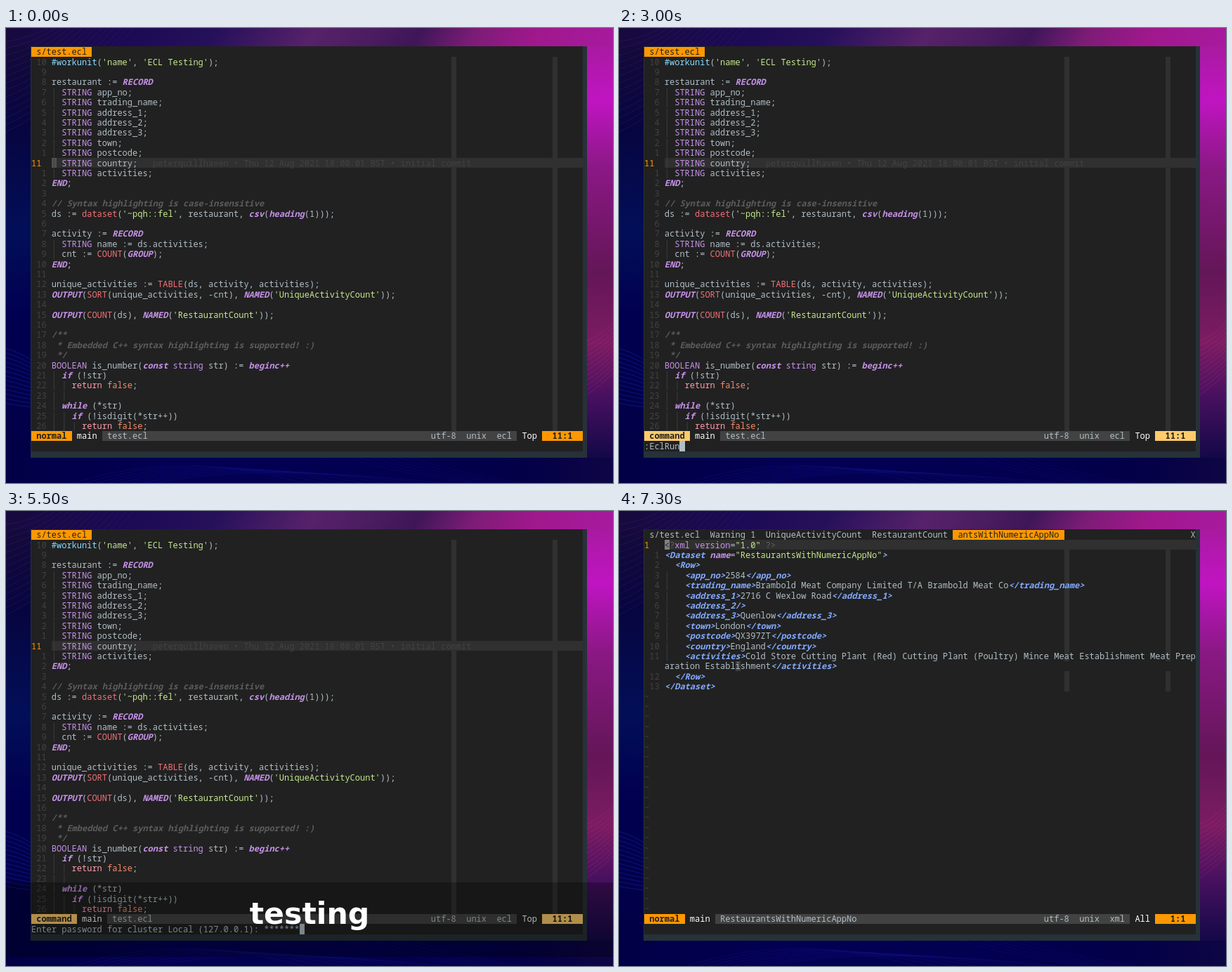
These frames come from a looping animation (864x648 px, 8000 ms). An HTML page:

```html
<!DOCTYPE html>
<html lang="en">
<head>
<meta charset="utf-8">
<title>Editor session</title>
<style>
html, body { margin: 0; width: 100%; height: 100%; overflow: hidden; background: #02004a; }
svg { display: block; width: 100vw; height: 100vh; }
rect { shape-rendering: crispEdges; }
text { font: 500 12px "Noto Sans Mono", "DejaVu Sans Mono", monospace; white-space: pre; fill: #b0bec5; }
#keys text { font: bold 42.67px "DejaVu Sans", sans-serif; fill: #fff; text-anchor: middle; }
.p { fill: #c792ea; }
.k { fill: #c792ea; font-weight: bold; font-style: italic; }
.b { fill: #82aaff; font-weight: bold; font-style: italic; }
.c { fill: #89ddff; }
.g { fill: #c3e88d; }
.r { fill: #f07178; }
.n { fill: #ff9cac; }
.o { fill: #f78c6c; }
.m { fill: #5c5c5c; font-weight: bold; font-style: italic; }
.d { fill: #424242; }
.q { fill: #616161; }
.l { fill: #ff9800; }
.w { fill: #fff; }
.x { fill: #212121; }
.X { fill: #212121; font-weight: bold; }
</style>
</head>
<body>
<svg viewBox="0 0 864 648" preserveAspectRatio="none">
  <defs id="defs"></defs>
  <g id="wall"></g>
  <rect x="35" y="26" width="792" height="586" fill="#263238"/>
  <rect x="36" y="26" width="785" height="576.6" fill="#212121"/>
  <g id="code"></g>
  <g id="xml"></g>
  <g id="status"></g>
  <g id="keys">
    <rect y="529" width="864" height="106" opacity=".3"/>
    <text x="432" y="588"></text>
    <rect id="line" y="589" height="3" fill="#fff"/>
  </g>
</svg>
<script>
const $ = id => document.getElementById(id);
const LOOP = 8000, CW = 7.2, RH = 14.4, LEFT = 36, TOP = 26.6;
const ORANGE = '#ff9800', YELLOW = '#ffcb6b', LINE = '#303030', GREY = '#424242';
const esc = s => s.replace(/&/g, '&amp;').replace(/</g, '&lt;');
const colX = c => +(LEFT + c * CW).toFixed(2);
const rowY = r => +(TOP + r * RH).toFixed(2);

// A filled block of terminal cells
const cells = (col, row, w, fill, h = 1) =>
  `<rect x="${colX(col)}" y="${rowY(row)}" width="${w * CW}" height="${h * RH}" fill="${fill}"/>`;

// Text at a cell; runs between § marks start with their style letter
function put(col, row, src) {
  let out = '';
  src.split('§').forEach((part, i) => {
    const style = i % 2 ? part[0] : '';
    const s = i % 2 ? part.slice(1) : part;
    if (s.trim()) out += `<tspan class="${style}" x="${colX(col)}">${esc(s)}</tspan>`;
    col += s.length;
  });
  return `<text y="${rowY(row) + 11.6}">${out}</text>`;
}

const guides = s => s.replace(/^[| ]*\|/, m => `§d${m}§`);
const lineNo = (n, row) => put(0, row, `§d${String(n).padStart(3)}§`);

const CODE = `§c#workunit§(§g'name'§, §g'ECL Testing'§);

restaurant := §kRECORD§
| §pSTRING§ app_no;
| §pSTRING§ trading_name;
| §pSTRING§ address_1;
| §pSTRING§ address_2;
| §pSTRING§ address_3;
| §pSTRING§ town;
| §pSTRING§ postcode;
| §pSTRING§ country;
| §pSTRING§ activities;
§kEND§;

§m// Syntax highlighting is case-insensitive§
ds := §rdataset§(§g'~pqh::fel'§, restaurant, §kcsv§(§kheading§(1)));

activity := §kRECORD§
| §pSTRING§ name := ds.activities;
| cnt := §rCOUNT§(§kGROUP§);
§kEND§;

unique_activities := §rTABLE§(ds, activity, activities);
§kOUTPUT§(§rSORT§(unique_activities, -cnt), §kNAMED§(§g'UniqueActivityCount'§));

§kOUTPUT§(§rCOUNT§(ds), §kNAMED§(§g'RestaurantCount'§));

§m/**§
§m * Embedded C++ syntax highlighting is supported! :)§
§m */§
§pBOOLEAN§ is_number(§kconst§ §pstring§ str) := §kbeginc++§
| §kif§ (!str)
| | §nreturn§ §ofalse§;
| |
| §kwhile§ (*str)
| | §kif§ (!isdigit(*str++))
| | | §nreturn§ §ofalse§;`.split('\n');

const tag = (name, value) => `|   §b<${name}>§${value}§b</${name}>§`;
const XML = [
  '§x<§§q?§§pxml version§=§g"1.0"§ §q?>§',
  '§b<Dataset§ §kname§=§g"RestaurantsWithNumericAppNo"§§b>§',
  '  §b<Row>§',
  tag('app_no', '2584'),
  tag('trading_name', 'Brambold Meat Company Limited T/A Brambold Meat Co'),
  tag('address_1', '2716 C Wexlow Road'),
  '|   §b<address_2/>§',
  tag('address_3', 'Quenlow'),
  tag('town', 'London'),
  tag('postcode', 'QX397ZT'),
  tag('country', 'England'),
  '|   §b<activities>§Cold Store Cutting Plant (Red) Cutting Plant (Poultry) Mince Meat Establishment Meat Prep',
  'aration Establishment§b</activities>§',
  '  §b</Row>§',
  '§b</Dataset>§'
];

function buildCode() {
  let s = cells(83, 1, 1, LINE, 37) + cells(103, 1, 1, LINE, 37) + cells(4, 11, 105, LINE);
  s += `<g id="cursor">${cells(4, 11, 1, '#505050')}</g>`;
  s += cells(0, 0, 12, ORANGE) + put(1, 0, '§xs/test.ecl§');
  CODE.forEach((line, i) => {
    const row = i + 1;
    s += row === 11 ? put(0, row, '§l11§') : lineNo(Math.abs(row - 11), row);
    s += put(4, row, guides(line));
  });
  return s + put(24, 11, '§dpeterquillhaven • Thu 12 Aug 2021 18:00:01 BST • initial commit§');
}

function buildXml() {
  let s = cells(4, 1, 105, LINE) + cells(4, 1, 1, '#808080') + cells(18, 13, 1, '#3e3e3e');
  for (const c of [83, 103]) s += cells(c, 2, 1, LINE, 11) + cells(c, 14, 1, LINE, 2);
  s += cells(61, 0, 22, ORANGE);
  s += put(1, 0, 's/test.ecl  Warning 1  UniqueActivityCount  RestaurantCount');
  s += put(62, 0, '§xantsWithNumericAppNo§') + put(108, 0, 'X');
  s += put(0, 1, '§l1§');
  XML.forEach((line, i) => {
    if (i && i !== 12) s += lineNo(i > 12 ? i - 1 : i, i + 1);
    s += put(4, i + 1, guides(line));
  });
  for (let r = 16; r < 38; r++) s += put(0, r, '§d~§');
  return s;
}

function buildStatus({ mode, cmd, caret, xml }) {
  const w = mode.length + 2, R = 38;
  const fill = mode === 'normal' ? ORANGE : YELLOW;
  const [file, type, at, pos] = xml
    ? ['RestaurantsWithNumericAppNo', 'xml', 'All', ' 1:1']
    : ['test.ecl', 'ecl', 'Top', '11:1'];
  return cells(0, R, w, fill) + cells(w + 6, R, 90 - w, GREY) + cells(101, R, 8, fill) +
    put(1, R, `§X${mode}§`) + put(w + 1, R, '§wmain§') + put(w + 7, R, file) +
    put(79, R, `utf-8  unix  ${type}`) + put(97, R, `§w${at}§`) + put(103, R, `§X${pos}§`) +
    put(0, 39, cmd) + (caret ? cells(cmd.length, 39, 1, '#b0bec5') : '');
}

function buildWall() {
  const strip = (id, box, vertical, stops) => {
    const [x, y, w, h] = box;
    $('defs').innerHTML += `<linearGradient id="${id}" x2="${vertical ? 0 : 1}" y2="${vertical ? 1 : 0}">` +
      stops.map(([o, c]) => `<stop offset="${o}" stop-color="${c}"/>`).join('') + '</linearGradient>';
    return `<rect x="${x}" y="${y}" width="${w}" height="${h}" fill="url(#${id})"/>`;
  };
  let s = strip('left', [0, 26, 36, 586], true, [[0, '#150a3a'], [.2, '#070540'], [.45, '#020f58'],
    [.65, '#010050'], [1, '#010046']]);
  s += strip('right', [827, 26, 37, 586], true, [[0, '#a81aa0'], [.13, '#c014c2'], [.3, '#8a1884'],
    [.55, '#641658'], [.72, '#7c1c62'], [.85, '#481060'], [1, '#140848']]);
  s += strip('bottom', [0, 612, 864, 36], false, [[0, '#010046'], [.3, '#030054'], [.6, '#020050'],
    [.85, '#030048'], [1, '#0e0644']]);
  // The top bands lean to the left
  s += '<g transform="skewX(-30)">' + strip('top', [0, 0, 884, 26], false, [[0, '#170a3c'], [.2, '#1c0a54'],
    [.34, '#26105a'], [.5, '#56226a'], [.6, '#4a1c60'], [.67, '#3e1658'], [.76, '#7c1c76'],
    [.86, '#a0188c'], [1, '#a81aa0']]) + '</g>';

  const waves = (n, color, opacity, curve) => {
    let d = '';
    for (let i = 0; i < n; i++) d += curve(i);
    return `<path d="${d}" fill="none" stroke="${color}" stroke-width="1" opacity="${opacity}"/>`;
  };
  s += waves(14, '#4a2a9a', .25, i => `M-4 ${20 + i * 10}Q${40 + i * 4} ${14 + i * 7} ${70 + i * 9} -6`);
  s += waves(13, '#2430c8', .4, i => `M-2 ${456 + i * 6.5}Q16 ${460 + i * 6.5} 38 ${474 + i * 5.5}`);
  s += waves(12, '#c23a8c', .25, i => `M826 ${446 + i * 7}Q846 ${438 + i * 6.5} 866 ${418 + i * 6.5}`);
  s += waves(8, '#1a1c9a', .25, i => `M${90 + i * 16} 650Q${250 + i * 14} ${596 + i * 3} ${430 + i * 30} 650`);
  s += waves(6, '#1a1c9a', .2, i => `M${480 + i * 18} 610Q${560 + i * 18} 636 ${680 + i * 14} 650`);
  return s;
}

const PROMPT = 'Enter password for cluster Local (127.0.0.1): ';
const typed = (word, mark = true) => ({ cmd: PROMPT + '*'.repeat(word.length), keys: word, mark });
const both = (s, mark = true) => ({ cmd: s, keys: s, mark });

// Each step changes part of the state from its time on
const STEPS = [
  [0, { mode: 'normal', cmd: '', caret: false, cursor: true, keys: '', mark: false, xml: false }],
  [500, { mode: 'command', cmd: ':', caret: true, cursor: false }],
  [600, { keys: ':', mark: true }],
  [700, { mark: false }],
  [1300, both(':E')],
  [1500, both(':Ec')],
  [1600, { cmd: ':Ecl' }],
  [1700, both(':Ecl')],
  [1900, { mark: false }],
  [2100, both(':EclR')],
  [2200, both(':EclRun')],
  [2300, { mark: false }],
  [3000, { keys: '' }],
  [3100, { cmd: PROMPT }],
  [3200, { keys: '⏎', mark: true }],
  [3400, { mark: false }],
  [3900, { keys: '' }],
  [4900, typed('t')],
  [5000, typed('tes')],
  [5100, typed('test')],
  [5200, typed('testin')],
  [5300, typed('testing')],
  [5500, { mark: false }],
  [6000, { keys: '' }],
  [6400, { mode: 'normal', caret: false, cursor: true, keys: '⏎', mark: true }],
  [6500, { mark: false }],
  [7100, { keys: '', cursor: false }],
  [7300, { cmd: '', xml: true }]
];

const show = (el, on) => el.setAttribute('display', on ? 'inline' : 'none');

function render(index) {
  const state = Object.assign({}, ...STEPS.slice(0, index + 1).map(s => s[1]));
  const label = $('keys').querySelector('text');
  show($('code'), !state.xml);
  show($('xml'), state.xml);
  show($('cursor'), state.cursor);
  $('status').innerHTML = buildStatus(state);
  show($('keys'), state.keys);
  label.textContent = state.keys;
  show($('line'), state.mark);
  if (state.keys && state.mark) {
    const last = state.keys.length - 1;
    const x = label.getStartPositionOfChar(last).x;
    $('line').setAttribute('x', x);
    $('line').setAttribute('width', label.getEndPositionOfChar(last).x - x);
  }
}

$('wall').innerHTML = buildWall();
$('code').innerHTML = buildCode();
$('xml').innerHTML = buildXml();

const start = performance.now();
let current = -1;
function tick() {
  const t = (performance.now() - start) % LOOP;
  const index = STEPS.filter(s => s[0] <= t).length - 1;
  if (index !== current) render(current = index);
  requestAnimationFrame(tick);
}
tick();
</script>
</body>
</html>
```
